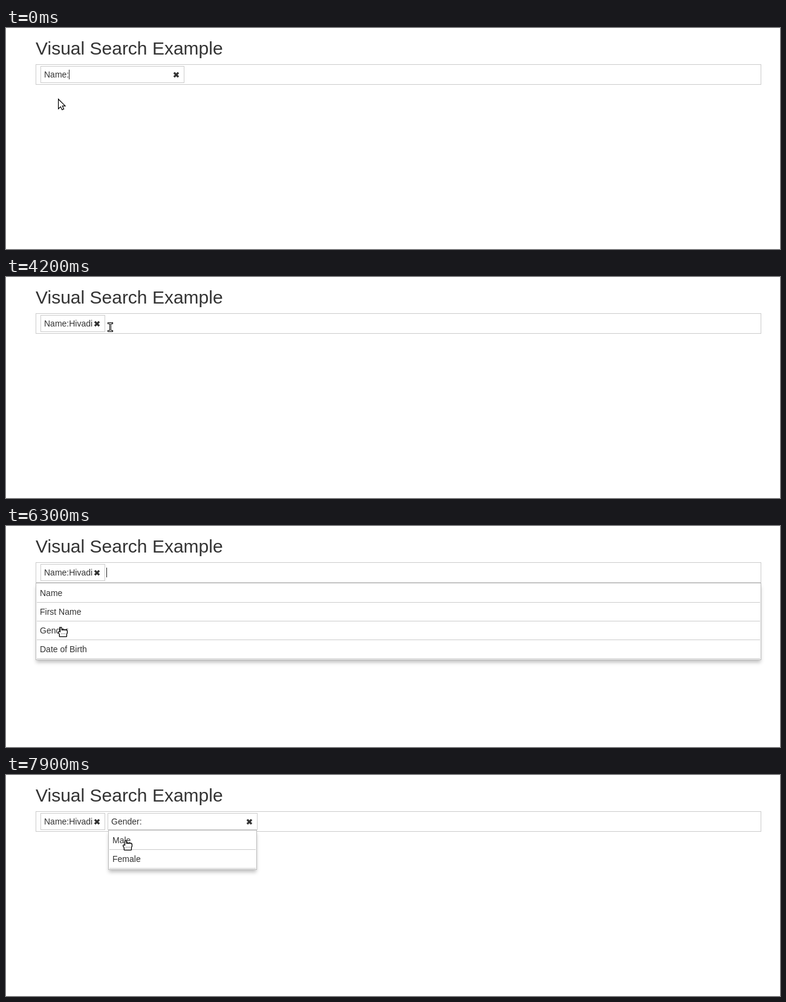
Animation of 1280x366 px, one loop 8 s. Source, as an HTML page:

```html
<!DOCTYPE html>
<html lang="en">
<head>
<meta charset="utf-8">
<title>Visual Search Example</title>
<style>
  html, body { margin: 0; width: 100%; height: 100%; overflow: hidden; background: #fff; }
  body { position: relative; font: 14px/20px "Liberation Sans", Arial, sans-serif; color: #333; }
  h1 { position: absolute; left: 49px; top: 17px; margin: 0; font-size: 30px; line-height: 33px; font-weight: 400; white-space: nowrap; }
  .bar, .chip, .menu { position: absolute; box-sizing: border-box; border: 1px solid #ccc; background: #fff; }
  .bar { left: 49px; top: 60px; width: 1200px; height: 34px; }
  .chip { top: 63px; height: 28px; padding-left: 5px; display: flex; align-items: center; white-space: pre; }
  .chip svg { position: absolute; right: 7px; top: 8px; }
  .caret { width: 1px; height: 16px; background: #222; }
  #barCaret { position: absolute; left: 166px; top: 69px; }
  .menu { padding: 1px; border-color: #bbb; box-shadow: 0 5px 6px -1px rgba(0, 0, 0, .25); }
  .menu div { padding: 5px; border-bottom: 1px solid #ccc; }
  #fields { left: 49px; top: 94px; width: 1200px; }
  #genders { left: 169px; top: 91px; width: 246px; }
  #pointer { position: absolute; left: 0; top: 0; width: 1280px; height: 366px; }
</style>
</head>
<body>
<h1>Visual Search Example</h1>
<div class="bar"></div>
<div class="chip" id="nameChip" style="left:57px"><span id="nameText"></span><i class="caret" id="nameCaret"></i></div>
<div class="chip" id="genderChip" style="left:168px;width:248px"><span>Gender:</span><i class="caret" id="genderCaret"></i></div>
<i class="caret" id="barCaret"></i>
<div class="menu" id="fields"><div>Name</div><div>First Name</div><div>Gender</div><div>Date of Birth</div></div>
<div class="menu" id="genders"><div>Male</div><div>Female</div></div>
<svg id="pointer">
  <g id="arrow" fill="#fff" stroke="#000" stroke-width="1.2">
    <path d="M.6 .8V16.8L4.4 13.4L6.8 18.4L9.6 17.2L7.3 12.2H12Z"/>
  </g>
  <g id="beam" fill="none" stroke-linecap="square">
    <path d="M-2.5 -6.5H3.5M.5 -6.5V6.5M-2.5 6.5H3.5" stroke="#000" stroke-width="3"/>
    <path d="M-2.5 -6.5H3.5M.5 -6.5V6.5M-2.5 6.5H3.5" stroke="#fff"/>
  </g>
  <g id="hand" fill="#fff" stroke="#000" stroke-width="1.3">
    <path d="M-.5 6V1a1.4 1.4 0 0 1 2.8 0V4H9.3Q11.4 4.2 11.4 6.5V9L10.4 11V14.4Q10.4 15.4 9.4 15.4H-.7Q-1.7 15.4 -1.7 14.4V11.5L-3.4 8.5Q-3.5 5.8 -.5 7.2Z"/>
    <path d="M1 10.5H9" stroke="#555" stroke-width="1" stroke-dasharray="1 1"/>
  </g>
</svg>
<script>
const LOOP = 8000, STEP = 100;
const NAME = "Hivadi";
const KEY_TIMES = [800, 1200, 1400, 1600, 1800, 2100];
const ENTER = 3400, OPEN_FIELDS = 4800, PICK_GENDER = 6900;

// Each move glides from the previous stop; power sets the ease-out per axis.
const START = { x: 86, y: 117 };
const MOVES = [
  { from: 3900, to: 4400, x: 182, y: 78, power: { x: 2.5, y: 2.2 } },
  { from: 5300, to: 6400, x: 90, y: 171, power: { x: 3.6, y: 1.45 } },
  { from: 7100, to: 7900, x: 197, y: 109, power: { x: 1.8, y: 1.9 } }
];

const $ = id => document.getElementById(id);
const show = (id, on) => { $(id).style.display = on ? "" : "none"; };
const clamp = v => Math.max(0, Math.min(1, v));
const blink = age => age >= 0 && age % 1200 < 600;
const fade = (id, age) => {
  show(id, age >= 0);
  $(id).style.opacity = clamp(.18 + age / 200);
};

document.querySelectorAll(".chip").forEach(chip => chip.insertAdjacentHTML("beforeend",
  '<svg width="11" height="11"><path d="M1.9 1.9L9.1 9.1M9.1 1.9L1.9 9.1" stroke="#333" stroke-width="3.3"/></svg>'));

function pointerAt(t, axis) {
  return Math.round(MOVES.reduce((pos, move) => {
    const left = 1 - clamp((t - move.from) / (move.to - move.from));
    return pos + (move[axis] - pos) * (1 - left ** move.power[axis]);
  }, START[axis]));
}

function drawPointer(t) {
  const x = pointerAt(t, "x"), y = pointerAt(t, "y");
  const overMenu = t >= PICK_GENDER ? x >= 169 && y >= 91 : t >= OPEN_FIELDS && y >= 94;
  const shape = overMenu ? "hand" : x > 164 && y < 94 ? "beam" : "arrow";
  for (const id of ["arrow", "beam", "hand"]) show(id, id === shape);
  $(shape).setAttribute("transform", `translate(${x} ${y})`);
}

function draw() {
  const t = Math.floor(performance.now() % LOOP / STEP) * STEP;
  const typed = KEY_TIMES.filter(k => k <= t);
  const picked = t >= PICK_GENDER;

  $("nameText").textContent = "Name:" + NAME.slice(0, typed.length);
  $("nameChip").style.width = (t < ENTER ? 238 : 107) + "px";
  show("nameCaret", t < ENTER && (typed.length ? blink(t - typed.at(-1)) : t < 400));
  show("barCaret", !picked && blink(t - OPEN_FIELDS));
  show("genderChip", picked);
  show("genderCaret", blink(t - PICK_GENDER));
  fade("fields", picked ? -1 : t - OPEN_FIELDS);
  fade("genders", t - PICK_GENDER);
  drawPointer(t);
  requestAnimationFrame(draw);
}
draw();
</script>
</body>
</html>
```
